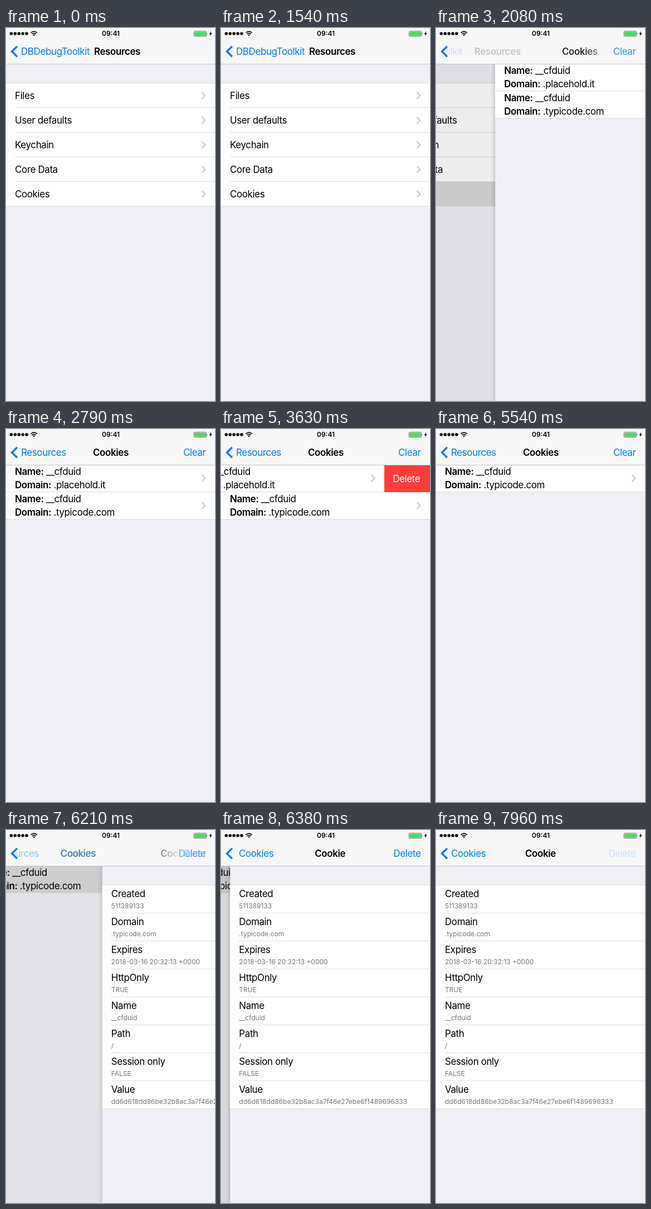
Recreate the animation shown at these times as an HTML page. Size 375 by 667 pixels, loop 8000 ms.

```html
<!DOCTYPE html>
<html lang="en">
<head>
<meta charset="utf-8">
<title>Cookie browser</title>
<style>
  html, body { margin: 0; width: 100%; height: 100%; overflow: hidden; }
  #stage { position: absolute; width: 375px; height: 667px; overflow: hidden; background: #efeff4;
    font: 17px/20px Inter, "Open Sans", sans-serif; letter-spacing: -.024em; color: #000; }
  #stage div, #stage svg { position: absolute; }
  .page { inset: 0; background: #efeff4; }
  .over { box-shadow: 0 0 9px rgba(0, 0, 0, .28); }
  .dim { inset: 0; background: #000; }
  .text { margin-top: -10px; white-space: pre; }
  .text b, .title { font-weight: 600; }
  .small { font-size: 12px; letter-spacing: 0; color: #757575; }
  .block { left: 0; width: 375px; background: #fff; }
  .line { right: 0; height: 1px; background: #dddde0; }
  .blue { color: #007aff; }
  .red { right: 0; top: 0; height: 100%; overflow: hidden; color: #fff; }
  #nav { left: 0; top: 0; width: 375px; height: 64px; background: #f7f7f8; border-bottom: 1px solid #c4c4c7; }
  .layer { inset: 0; overflow: hidden; }
  #labels { -webkit-mask-image: linear-gradient(90deg, transparent 12px, #000 26px);
    mask-image: linear-gradient(90deg, transparent 12px, #000 26px); }
  #titles { -webkit-mask-image: linear-gradient(90deg, #000 265px, transparent 315px);
    mask-image: linear-gradient(90deg, #000 265px, transparent 315px); }
  .time { font-size: 12px; font-weight: 600; letter-spacing: 0; }
</style>
</head>
<body>
<div id="stage">
  <div class="layer" id="pages"></div>
  <div id="nav">
    <div class="layer" id="titles"></div>
    <div class="layer" id="labels"></div>
    <div class="layer" id="actions"></div>
    <svg width="375" height="64" fill="none">
      <g id="signal" fill="#000"></g>
      <g stroke="#000" stroke-width="1.7">
        <path d="M44.6 8.6Q50.2 3.7 55.8 8.6M46.6 10.9Q50.2 7.8 53.8 10.9"/>
        <path d="M48.2 12.3Q50.2 10.7 52.2 12.3L50.2 14.2Z" fill="#000" stroke="none"/>
      </g>
      <rect x="337.2" y="5.7" width="22.6" height="9" rx="1.8" stroke="#555" stroke-width=".8"/>
      <rect x="338.2" y="6.7" width="20.6" height="7" rx="1" fill="#4cd964"/>
      <path d="M360.4 8.5q1.6 1.6 0 3.4z" fill="#444"/>
      <path d="M368.3 5.6L364.6 10.8H366.8L365.8 14.6L369.8 9.2H367.4Z" fill="#000"/>
      <path d="M20 32.8L10.6 42L20 51.2" stroke="#007aff" stroke-width="3.3"/>
    </svg>
  </div>
</div>
<script>
const LOOP = 8000, WIDTH = 375, ROW = 49, BUTTON = 82;
const $ = id => document.getElementById(id);

function box(parent, cls, style = {}, html = '') {
  const el = document.createElement('div');
  el.className = cls;
  el.innerHTML = html;
  for (const key in style) el.style[key] = typeof style[key] === 'number' ? style[key] + 'px' : style[key];
  return parent.appendChild(el);
}
const text = (parent, x, y, html, cls = '') => box(parent, 'text ' + cls, { left: x, top: y }, html);
const line = (parent, y, left = 0) => box(parent, 'line', { top: y, left });
const chevron = (parent, y) => box(parent, '', { left: 348, top: y - 8 },
  '<svg width="12" height="16"><path d="M3.5 2L9.3 8L3.5 14" fill="none" stroke="#c7c7cc" stroke-width="2"/></svg>');

// Pages
const pages = [0, 1, 2].map(i => box($('pages'), i ? 'page over' : 'page'));

const menu = ['Files', 'User defaults', 'Keychain', 'Core Data', 'Cookies'];
const menuRows = menu.map((name, i) => {
  const row = box(pages[0], 'block', { top: 99 + 44 * i, height: 44 });
  text(row, 16, 22, name);
  chevron(row, 22);
  line(row, 43, i < menu.length - 1 ? 16 : 0);
  return row;
});
line(pages[0], 98);

function cookieRow(top, domain) {
  const row = box(pages[1], 'block', { top, height: ROW });
  const content = box(row, 'block', { top: 0, height: ROW, background: 'none' });
  text(content, 16, 12, '<b>Name:</b> __cfduid');
  text(content, 16, 36, '<b>Domain:</b> ' + domain);
  chevron(content, 24);
  line(row, ROW - 1);
  return { row, content };
}
const first = cookieRow(64, '.placehold.it');
const second = cookieRow(64 + ROW, '.typicode.com');
const remove = box(first.row, 'red');
text(remove, 15, 24.5, 'Delete');

const details = [
  ['Created', '511389133'], ['Domain', '.typicode.com'],
  ['Expires', '2018-03-16 20:32:13 +0000'], ['HttpOnly', 'TRUE'],
  ['Name', '__cfduid'], ['Path', '/'], ['Session only', 'FALSE'],
  ['Value', 'dd6d618dd86be32b8ac3a7f46e27ebe6f1489696333']
];
details.forEach(([name, value], i) => {
  const row = box(pages[2], 'block', { top: 99 + 50 * i, height: 50 });
  text(row, 16, 15, name);
  text(row, 16, 36.5, value, 'small');
  line(row, 49, i < details.length - 1 ? 16 : 0);
});
line(pages[2], 98);
const dims = pages.map(page => box(page, 'dim'));

// Navigation bar
for (let i = 0; i < 5; i++)
  $('signal').innerHTML += `<circle cx="${9.4 + 6.9 * i}" cy="10" r="2.8"/>`;
text($('nav'), 172, 10, '09:41', 'time');

const screens = [
  { back: 'DBDebugToolkit', backWidth: 124, title: 'Resources', x: 158, action: '' },
  { back: 'Resources', backWidth: 80, title: 'Cookies', x: 156, action: 'Clear', push: 1943, labelDelay: 130 },
  { back: 'Cookies', backWidth: 62, title: 'Cookie', x: 160, action: 'Delete', push: 6112, labelDelay: 0 }
];
for (const s of screens) {
  s.labelEl = text($('labels'), 0, 42, s.back, 'blue');
  s.titleEl = text($('titles'), 0, 42, s.title, 'title');
  s.actionEl = box($('actions'), 'text blue', { right: 16.5, top: 42 }, s.action);
}

// Motion
const clamp = v => Math.max(0, Math.min(1, v));

// Share of the way still to go for a critically damped spring.
function remaining(t, start, speed) {
  const u = (t - start) / 1000 * speed;
  return u <= 0 ? 1 : u > 13.5 ? 0 : (1 + u) * Math.exp(-u);
}
const pageLeft = (s, t) => !s ? 1 : s.push ? remaining(t, s.push, 18.26) : 0;
const navLeft = (s, t) => !s ? 1 : s.push ? remaining(t, s.push + 25, 20.8) : 0;
const moveX = (el, x) => el.style.transform = `translateX(${x}px)`;
const moveY = (el, y) => el.style.transform = `translateY(${y}px)`;
const show = (el, on) => el.style.visibility = on ? 'visible' : 'hidden';

function drawPages(t) {
  screens.forEach((s, i) => {
    const enter = pageLeft(s, t), leave = 1 - pageLeft(screens[i + 1], t);
    moveX(pages[i], enter * WIDTH - leave * WIDTH * .3);
    show(pages[i], enter < 1);
    dims[i].style.opacity = leave * .1;
  });
  menuRows[4].style.background = t >= 1920 ? '#d9d9d9' : '#fff';
  second.row.style.background = t >= 6000 ? '#d9d9d9' : '#fff';
}

function drawNav(t) {
  screens.forEach((s, i) => {
    const enter = navLeft(s, t), stay = navLeft(screens[i + 1], t), leave = 1 - stay;
    const fade = (1 - enter ** 1.5) * stay ** 1.5;
    const labelStart = i ? screens[i - 1].x + 2 : 27;
    const labelIn = i ? clamp((t - s.push - s.labelDelay) / 180) : 1;
    moveX(s.labelEl, 27 + enter * (labelStart - 27) - leave * (27 + s.backWidth));
    moveX(s.titleEl, s.x + enter * (WIDTH - s.x) - leave * (s.x - 27));
    s.labelEl.style.opacity = labelIn * stay ** 1.5;
    s.titleEl.style.opacity = fade;
    s.actionEl.style.opacity = fade;
  });
  const press = clamp((t - 7790) / 170);
  if (press) screens[2].actionEl.style.opacity = 1 - .83 * (1 - (1 - press) ** 2);
}

function drawCookies(t) {
  const swipe = BUTTON * (1 - remaining(t, 3080, 15));
  const gone = 1 - remaining(t, 4500, 24.4);
  moveX(first.content, -swipe);
  remove.style.width = swipe + 'px';
  remove.style.background = t >= 4500 ? '#e8413d' : '#fc3d39';
  moveY(first.row, -gone * ROW / 2);
  moveY(second.row, -gone * ROW);
  first.row.style.display = gone < 1 ? 'block' : 'none';
}

const begin = performance.now();
function frame() {
  const t = (performance.now() - begin) % LOOP;
  drawPages(t);
  drawNav(t);
  drawCookies(t);
  requestAnimationFrame(frame);
}
frame();
</script>
</body>
</html>
```
